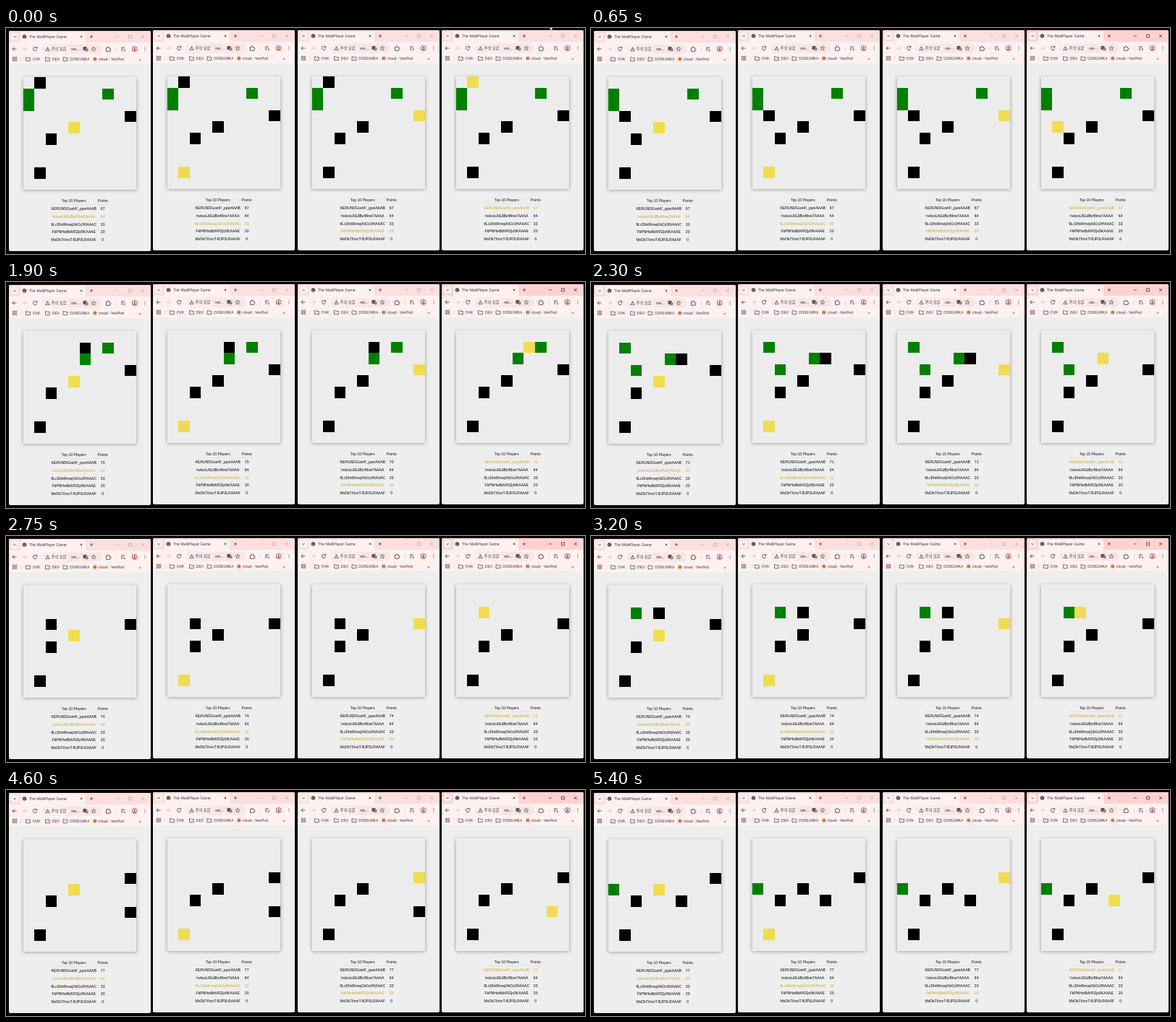
Animation of 800x313 px, one loop 5450 ms. Source, as an HTML page with a canvas:

```html
<!DOCTYPE html>
<html lang="en">
<head>
<meta charset="utf-8">
<title>The MultiPlayer Game</title>
<style>
html, body { margin: 0; width: 100%; height: 100%; overflow: hidden; background: #000; }
canvas { display: block; }
</style>
</head>
<body>
<canvas id="stage" width="800" height="313"></canvas>
<script>
const ctx = document.getElementById('stage').getContext('2d');
const LOOP = 5450, STEP = 50, FOCUS = 150, CELL = 15.62, LIFE = 450;
const SANS = '"Liberation Sans", Arial, sans-serif';
const HANGUL = '"Noto Sans CJK KR", "Noto Sans CJK", sans-serif';
const INK = '#3c3436', PALE = '#b3a2a4', YELLOW = '#f0dc50';

const turn = (t, x, y) => ({ t, x, y });
const fruit = (t, x, y, life = LIFE) => ({ t, x, y, born: t - life });

// Stops of the moving player, each with its arrival time
const stops = [
  turn(0, 1, 0), turn(900, 6, 4),
  fruit(1400, 0, 1, 1400), fruit(1450, 0, 2, 1450), fruit(1650, 3, 3, 900),
  fruit(1950, 7, 1, 1950), fruit(2300, 5, 2, 900),
  fruit(2550, 1, 1), fruit(2700, 2, 3), turn(2950, 6, 2),
  fruit(3250, 2, 2), turn(3650, 6, 3), fruit(3750, 4, 3), fruit(4250, 8, 1),
  turn(4550, 9, 6), turn(4700, 6, 6), turn(4750, 6, 5), fruit(5800, 0, 4, 1000)
];
const fruits = stops.filter(s => 'born' in s);
const idle = [turn(0, 4, 4), turn(0, 1, 8), turn(0, 9, 3)];
const bystander = turn(0, 2, 5);
const players = ['KERUNDGoxhF_ppviAAAB', 'hvkxsLKEdBz48ne7AAAA', '9LcDhitRmwjXkOz3HAAAC',
  'FkPNHwBdVRZjo5KAAAE', 'MvDk7XmcT-BJP3LRAAAF'];

function rect(x, y, w, h, color, r = 0) {
  ctx.fillStyle = color;
  ctx.beginPath();
  ctx.roundRect(x, y, w, h, r);
  ctx.fill();
}
function disc(x, y, r, color) {
  rect(x - r, y - r, 2 * r, 2 * r, color, r);
}
function stroke(path, color = INK, width = .8) {
  ctx.strokeStyle = color;
  ctx.lineWidth = width;
  ctx.stroke(new Path2D(path));
}
function text(s, x, y, size = 5.2, color = INK, align = 'left', font = SANS) {
  ctx.font = `${size}px ${font}`;
  ctx.fillStyle = color;
  ctx.textAlign = align;
  ctx.fillText(s, x, y);
}

// One cell per step, rows first, leaving just in time for the next stop
function position(t) {
  const i = Math.max(1, stops.findIndex(s => s.t >= t));
  const from = stops[i - 1], to = stops[i];
  const dx = to.x - from.x, dy = to.y - from.y;
  const rows = Math.abs(dy), cols = Math.abs(dx);
  const walked = Math.max(0, rows + cols - (to.t - t) / STEP);
  const down = Math.min(rows, walked);
  return { x: from.x + Math.sign(dx) * (walked - down), y: from.y + Math.sign(dy) * down };
}

function tabs(focused) {
  rect(4, 4, 196, 20, focused ? '#ffd2d1' : '#fcdedd', 2);
  rect(4, 20, 196, 30, '#fff1f0');
  rect(7, 7, 10, 10, '#fff0ef', 3);
  stroke('M10.3 11.3l1.7 1.7 1.7-1.7');
  rect(20, 5.5, 90, 16, '#fff1f0', 3);
  disc(25.5, 12, 2.8, '#4a4648');
  stroke('M23.6 11.3l1.5 1 .5 1.6M26 10l1.3 1', '#e8dedf', .7);
  text('The MultiPlayer Game', 32, 14);
  stroke('M102.7 10.7l2.6 2.6m0-2.6l-2.6 2.6M116 12h4m-2-2v4');
  stroke('M152 12h4M169.5 10h4v4h-4zM187 10l4 4m0-4l-4 4', focused ? '#222' : PALE, .7);
}

function toolbar() {
  stroke('M14.5 29h-5.4m2.3-2.4L9.1 29l2.3 2.4');
  stroke('M23 29h5.4m-2.3-2.4l2.3 2.4-2.3 2.4', '#cbb9ba');
  stroke('M42.3 27.6a2.6 2.6 0 1 0 .3 2M42.7 26v2h-2');
  rect(50, 23, 82, 12.5, '#f8e5e5', 6);
  rect(52, 24.2, 35, 10, '#fff1f0', 5);
  stroke('M57.5 26.5l2.8 5h-5.6zM57.5 28.3v1.6', INK, .7);
  text('주의 요함', 62.5, 31, 5.4, INK, 'left', HANGUL);
  text('ste...', 90, 30.8, 5.4);
  rect(106.5, 26, 5, 5, '#5a5052', 1);
  rect(109.5, 28.3, 4, 4, '#8d8284', 1);
  stroke('M121 26l.9 2 2.2.2-1.7 1.4.5 2.2-1.9-1.2-1.9 1.2.5-2.2-1.7-1.4 2.2-.2z', INK, .6);
  stroke('M138.5 27.5h1.6q0-1.5 1-1.5t1 1.5h1.6v1.6q1.3 0 1.3 1t-1.3 1v1.2h-5.2z');
  stroke('M152.5 26v6.5', '#ecd0cf');
  stroke('M159 27h5m-5 2h3m-3 2h2m3-2v2.5h-1.5');
  disc(177.7, 29, 3.7, '#a43b35');
  disc(177.7, 29, 2.9, '#fff1f0');
  disc(177.7, 28.2, 1.1, '#a43b35');
  rect(175.9, 29.8, 3.6, 1.4, '#a43b35', .7);
  for (let y = 27; y < 32; y += 2) disc(192, y, .6, INK);
}

function folder(x, name, size) {
  stroke(`M${x} 40.7h2l.8.8h3v4.2h-5.8z`, INK, .7);
  text(name, x + 9.2, 45, size);
}
function bookmarks() {
  stroke('M9.3 40.2h2v2h-2zM12.7 40.2h2v2h-2zM9.3 43.5h2v2h-2zM12.7 43.5h2v2h-2z', INK, .6);
  stroke('M21 40v6', '#ecd0cf');
  folder(27.5, 'OVK', 5.1);
  folder(54.5, 'DEV', 5.1);
  folder(79, 'DOREUMKA', 4.7);
  disc(122.8, 43, 2.5, '#ec6b35');
  text('cloud - VexPod', 128, 45);
  text('»', 185, 45, 6, INK, 'center');
}

function cell({ x, y }, color) {
  const edge = (start, n) => Math.round(start + n * CELL);
  const left = edge(23.6, x), top = edge(68, y);
  rect(left, top, edge(23.6, x + 1) - left, edge(68, y + 1) - top, color);
}
function board(t, self) {
  ctx.save();
  ctx.shadowColor = 'rgba(0,0,0,.38)';
  ctx.shadowBlur = 5;
  ctx.shadowOffsetY = .6;
  rect(24, 68, 156, 156, '#ececec');
  ctx.restore();
  for (const f of fruits) if (t >= f.born && t < f.t) cell(f, '#008000');
  cell(bystander, '#000');
  [position(t), ...idle].forEach((p, i) => cell(p, i === self ? YELLOW : '#000'));
}

function table(t, row) {
  const score = 67 + fruits.filter(f => t >= f.t).length;
  const points = [score, 64, row === 2 ? 32 : 33, 20, 0];
  const line = (name, value, y, color) => {
    text(name, 93.7, y, 5.1, color, 'center');
    text(value, 133.7, y, 5.1, color, 'center');
  };
  line('Top 10 Players', 'Points', 240.5, '#111');
  stroke('M62 244.3h80', '#d9d9d9', .6);
  players.forEach((name, i) =>
    line(name, points[i], 252.4 + i * 10.6, i === row ? '#c8a92c' : '#000'));
}

// Each window belongs to one player; the last one is the moving player's
function browser(n, t) {
  const active = n === 3;
  const seen = active ? t : Math.max(0, t - STEP); // others lag one step
  const row = (n + 1) % 4;
  ctx.save();
  ctx.translate(Math.round(n * 199.4), n ? -1 : 0);
  rect(4, 4, 196, 305, '#eeeeee', 2);
  tabs(active && t >= FOCUS);
  toolbar();
  bookmarks();
  board(seen, row);
  table(seen, row);
  ctx.restore();
}

function draw(t) {
  rect(0, 0, 800, 313, '#000');
  for (let n = 0; n < 4; n++) browser(n, t);
  if (t < FOCUS) rect(751.5, 0, 3.5, 2.5, '#e8e8e8', 1);
}

let last = -1;
function tick() {
  const t = Math.floor(performance.now() % LOOP / STEP) * STEP;
  if (t !== last) draw(last = t);
  requestAnimationFrame(tick);
}
tick();
</script>
</body>
</html>
```
